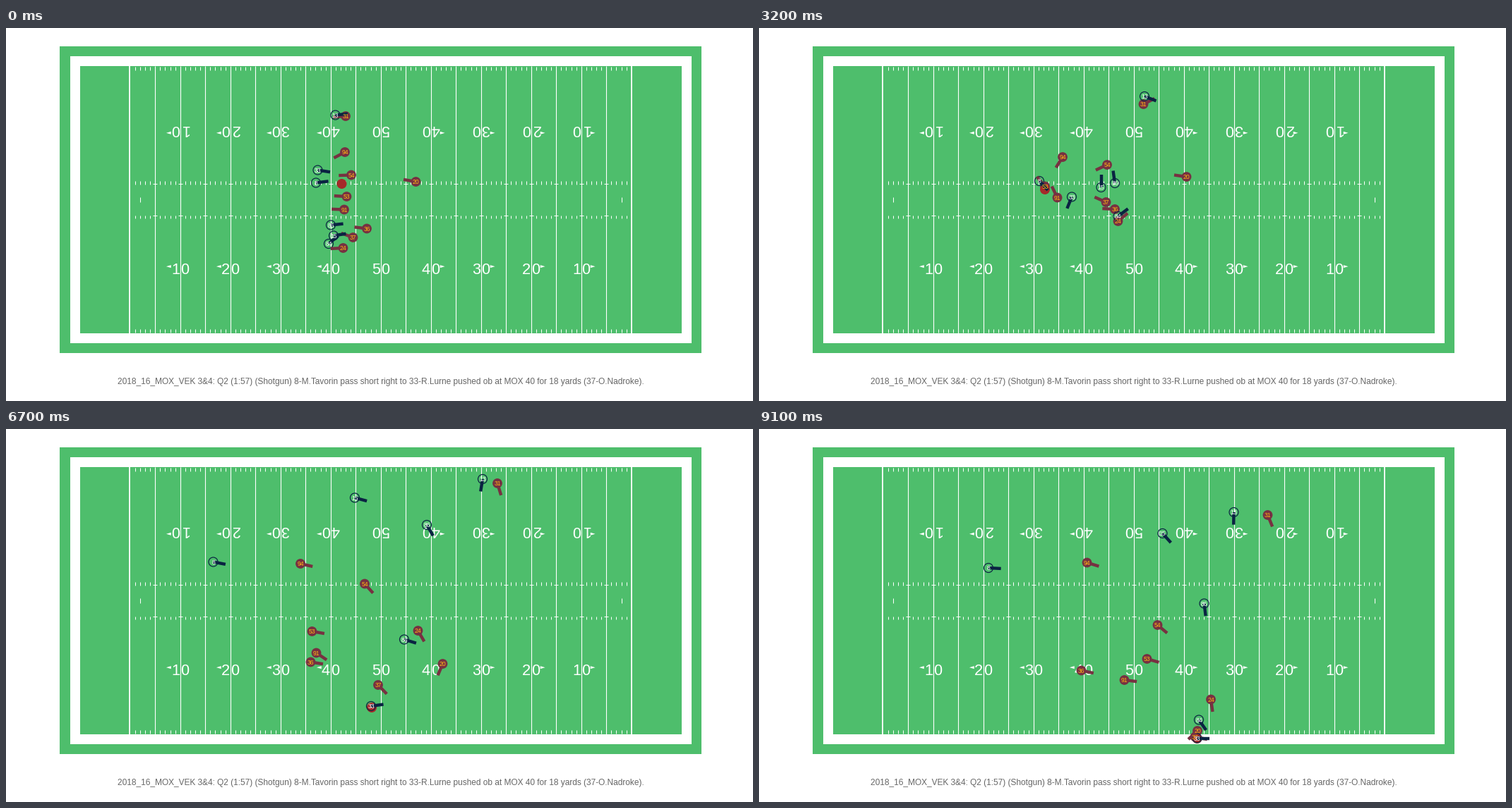
Write a matplotlib script that moves like this. It is 1058x529 px and loops after 9200 ms.

```python
import numpy as np
import matplotlib.pyplot as plt
from matplotlib.animation import FuncAnimation
from matplotlib.patches import Circle, Polygon, Rectangle

W, H, DPI = 1058, 529, 64
FRAMES, INTERVAL = 92, 100
FONT = "Liberation Sans"
GREEN, NAVY, MAROON, GOLD, BROWN = "#4ebe6c", "#0a2342", "#773141", "#ffb612", "#a52a2a"
YARD, CX, CY = 7.1, 530.75, 243.5
CAPTION = ("2018_16_MOX_VEK 3&4: Q2 (1:57) (Shotgun) 8-M.Tavorin pass short right to "
           "33-R.Lurne pushed ob at MOX 40 for 18 yards (37-O.Nadroke).")


def pt(px):
    return px * 72 / DPI


fig = plt.figure(figsize=(W / DPI, H / DPI), dpi=DPI, facecolor="white")
ax = fig.add_axes([0, 0, 1, 1])
ax.set(xlim=(0, W), ylim=(H, 0))
ax.axis("off")


def label(x, y, s, size, color, z, flip=False):
    """Text centred on the middle of its digits."""
    drop = 0.355 * size * (-1 if flip else 1)
    return ax.text(x, y + drop, s, fontsize=pt(size), color=color, family=FONT,
                   ha="center", va="baseline", rotation=180 if flip else 0,
                   rotation_mode="anchor", zorder=z)


# ---- field ----

def x_at(yard):
    return CX + (yard - 50) * YARD


def draw_field():
    for grow, color in ((4, GREEN), (2, "white"), (0, GREEN)):
        w, h = (120 + 2 * grow) * YARD, (160 / 3 + 2 * grow) * YARD
        ax.add_patch(Rectangle((CX - w / 2, CY - h / 2), w, h, fc=color, lw=0, zorder=0))
    top, bottom = CY - 80 / 3 * YARD, CY + 80 / 3 * YARD
    hash_top, hash_bottom = CY - 22.2, CY + 22.2

    def vlines(xs, y0, y1, lw):
        ax.vlines(xs, y0, y1, colors="white", lw=pt(lw), zorder=1)

    fives = [x_at(n) for n in range(5, 100, 5)]
    ones = [x_at(n) for n in range(1, 100) if n % 5]
    vlines([175, 886.4], top, bottom, 1.8)
    vlines(fives, top, bottom, 1.1)
    for y0 in (top + 1.2, hash_top - 4.5, hash_bottom, bottom - 6):
        vlines(ones, y0, y0 + 4.7, 1)
    for y in (hash_top - 0.5, hash_bottom):
        for x in fives:
            ax.hlines(y, x - 3, x + 3, colors="white", lw=pt(1), zorder=1)
    vlines([x_at(2), x_at(98)], CY - 3.5, CY + 3.5, 1)

    for yard in range(10, 100, 10):
        x, tens = x_at(yard), str(min(yard, 100 - yard) // 10)
        for side in (1, -1):
            y = CY + side * 97.8
            label(x - 6.8 * side, y, tens, 21.8, "white", 1, side < 0)
            label(x + 6.8 * side, y, "0", 21.8, "white", 1, side < 0)
            if yard != 50:
                d, ya = (-1 if yard < 50 else 1), CY + side * 94.7
                ax.add_patch(Polygon([(x + 19.8 * d, ya), (x + 13 * d, ya - 2),
                                      (x + 13 * d, ya + 2)], fc="white", lw=0, zorder=1))


# ---- motion ----

KEYS = (0, 16, 32, 54, 67, 77, 91)


def smooth(t, v):
    """Monotone cubic through (t, v), sampled on every frame."""
    t, v = np.asarray(t, float), np.asarray(v, float)
    h = np.diff(t)
    s = np.diff(v) / h
    m = np.zeros(len(t))
    m[0], m[-1] = s[0], s[-1]
    for i in range(1, len(t) - 1):
        a, b = s[i - 1], s[i]
        if a * b > 0:
            w1, w2 = 2 * h[i] + h[i - 1], h[i] + 2 * h[i - 1]
            m[i] = (w1 + w2) / (w1 / a + w2 / b)
    f = np.arange(FRAMES)
    i = np.clip(np.searchsorted(t, f, side="right") - 1, 0, len(t) - 2)
    u, d = (f - t[i]) / h[i], h[i]
    return ((1 + 2 * u) * (1 - u) ** 2 * v[i] + u * (1 - u) ** 2 * d * m[i]
            + u * u * (3 - 2 * u) * v[i + 1] + u * u * (u - 1) * d * m[i + 1])


def track(poses, extra=()):
    """Columns on every frame; nearly still until the snap."""
    rows = [(k, *p) for k, p in zip(KEYS, poses)] + list(extra)
    p0, p1 = np.array(poses[0]), np.array(poses[1])
    rows.append((9, *(p0 + 0.12 * (p1 - p0))))
    cols = np.array(sorted(rows)).T
    return [smooth(cols[0], c) for c in cols[1:]]


class Player:
    def __init__(self, number, home, poses, extra=()):
        self.x, self.y, angle = track(poses, extra)
        a = np.radians(angle)
        self.tip_x, self.tip_y = self.x + 17.7 * np.cos(a), self.y + 17.7 * np.sin(a)
        color = NAVY if home else MAROON
        self.stick, = ax.plot([], [], color=color, lw=pt(4.4),
                              solid_capstyle="butt", zorder=5)
        if home:
            self.dot = Circle((0, 0), 6.5, fill=False, ec=NAVY, lw=pt(1.2), zorder=4)
        else:
            self.dot = Circle((0, 0), 6.9, fc=MAROON, lw=0, zorder=2)
        ax.add_patch(self.dot)
        self.size = 8.6
        self.text = label(0, 0, str(number), self.size, "white" if home else GOLD,
                          7 if home else 6)

    def show(self, i):
        x, y = self.x[i], self.y[i]
        self.stick.set_data([x, self.tip_x[i]], [y, self.tip_y[i]])
        self.dot.center = x, y
        self.text.set_position((x, y + 0.355 * self.size))


draw_field()
ax.text(530.5, 505, CAPTION, fontsize=pt(11.93), color="#666666", family=FONT,
        ha="center", va="baseline")

# x, y and facing (degrees, clockwise from right) at each key time
players = [
    Player(31, False, [(481, 125, 176), (482.5, 125, 180), (544.5, 108, 333), (670, 80.5, 180),
                       (696, 77, 73), (707.5, 87.5, 47), (720.5, 122, 68)]),
    Player(94, False, [(480, 176, 152), (473, 177, 160), (430, 183, 122), (403, 191, 57),
                       (417, 191, 13), (433.5, 189.5, 16), (464.5, 189.5, 17)]),
    Player(54, False, [(489, 208.5, 178), (488.5, 209.5, 162), (493, 194, 155), (491, 184, 86),
                       (508, 219.5, 48), (531, 245, 32), (564.5, 278, 40)]),
    Player(53, False, [(482.5, 239, 183), (473, 238.5, 188), (405, 224.5, 230), (387, 254, 38),
                       (433.5, 287, 10), (482, 304, 12), (549.5, 326, 16)]),
    Player(91, False, [(479, 257.5, 182), (466, 256, 197), (422.5, 240.5, 244), (421, 273.5, 55),
                       (439.5, 317.5, 34), (468, 340, 20), (517.5, 356, 7)]),
    Player(36, False, [(511, 284.5, 187), (511, 283.5, 188), (504, 257, 183), (437.5, 322, 49),
                       (431.5, 330.5, 9), (430, 335, -2), (456.5, 342.5, 12)]),
    Player(37, False, [(491.5, 297, 200), (487, 294.5, 211), (491.5, 247, 204), (489.5, 296, 82),
                       (527, 363, 46), (574.5, 405.5, 59), (617.5, 436.5, 12)]),
    Player(24, False, [(477.5, 312, 177), (475.5, 309, 200), (508.5, 274, 320), (559.5, 236, 439),
                       (583.5, 286, 420), (614.5, 327.5, 439), (640, 383.5, 442)],
           [(20, 480, 302, 215)]),
    Player(20, False, [(580.5, 218, 190), (583, 219.5, 200), (605.5, 211, 188), (612.5, 266.5, 126),
                       (618.5, 333, 113), (626, 386, 142), (621, 428, 137)],
           [(40, 617.5, 220, 170)]),
    Player(13, True, [(466.5, 123.5, -6), (474, 120, -18), (546, 97, 21), (666, 74.5, -39),
                      (675, 71, 99), (676, 88, 71), (672.5, 118, 91)],
           [(20, 488, 113, -22), (40, 593, 89.5, 0), (59, 673, 70, -75)]),
    Player(86, True, [(460, 279.5, -6), (464.5, 277, -17), (504, 220, -98), (550.5, 120.5, 13),
                      (596, 136, 60), (616, 182, 92), (630.5, 247.5, 83)]),
    Player(15, True, [(464, 294.5, -9), (466, 289.5, -16), (484.5, 226, -90), (473, 117, -97),
                      (494, 97.5, 15), (526, 109.5, 31), (571.5, 148, 48)]),
    Player(84, True, [(457, 306, -40), (461, 303.5, -39), (508.5, 267, -37), (540, 246.5, 60),
                      (564, 298.5, 17), (590.5, 351, 71), (623, 412.5, 55)]),
    Player(8, True, [(439, 219.5, -7), (435.5, 219.5, 2), (397, 217, 47), (316.5, 192.5, 13),
                     (293.5, 188.5, 11), (300, 190.5, 5), (325, 197, 3)],
           [(20, 426.5, 220, 10), (40, 367.5, 209, 30), (60, 301.5, 189.5, 12)]),
    Player(33, True, [(441.5, 201.5, 9), (441, 200.5, 8), (443, 239.5, 112), (465.5, 340.5, 72),
                      (517, 393, -8), (571, 418.5, -14), (620.5, 438.5, 0)],
           [(40, 447, 271, 95), (60, 485, 367, 40)]),
]
ball_x, ball_y = track([(475.5, 221), (439, 221.5), (405, 229), (463.5, 342),
                        (518, 395), (571.5, 420), (620.5, 439)],
                       [(20, 431, 222), (30, 405.5, 225), (40, 447, 273), (60, 484, 369)])
ball = ax.add_patch(Circle((0, 0), 7, fc=BROWN, lw=0, zorder=3))


def update(i):
    for p in players:
        p.show(i)
    ball.center = ball_x[i], ball_y[i]
    return []


anim = FuncAnimation(fig, update, frames=FRAMES, interval=INTERVAL,
                     repeat=True, repeat_delay=0, blit=False)
plt.show()
```
